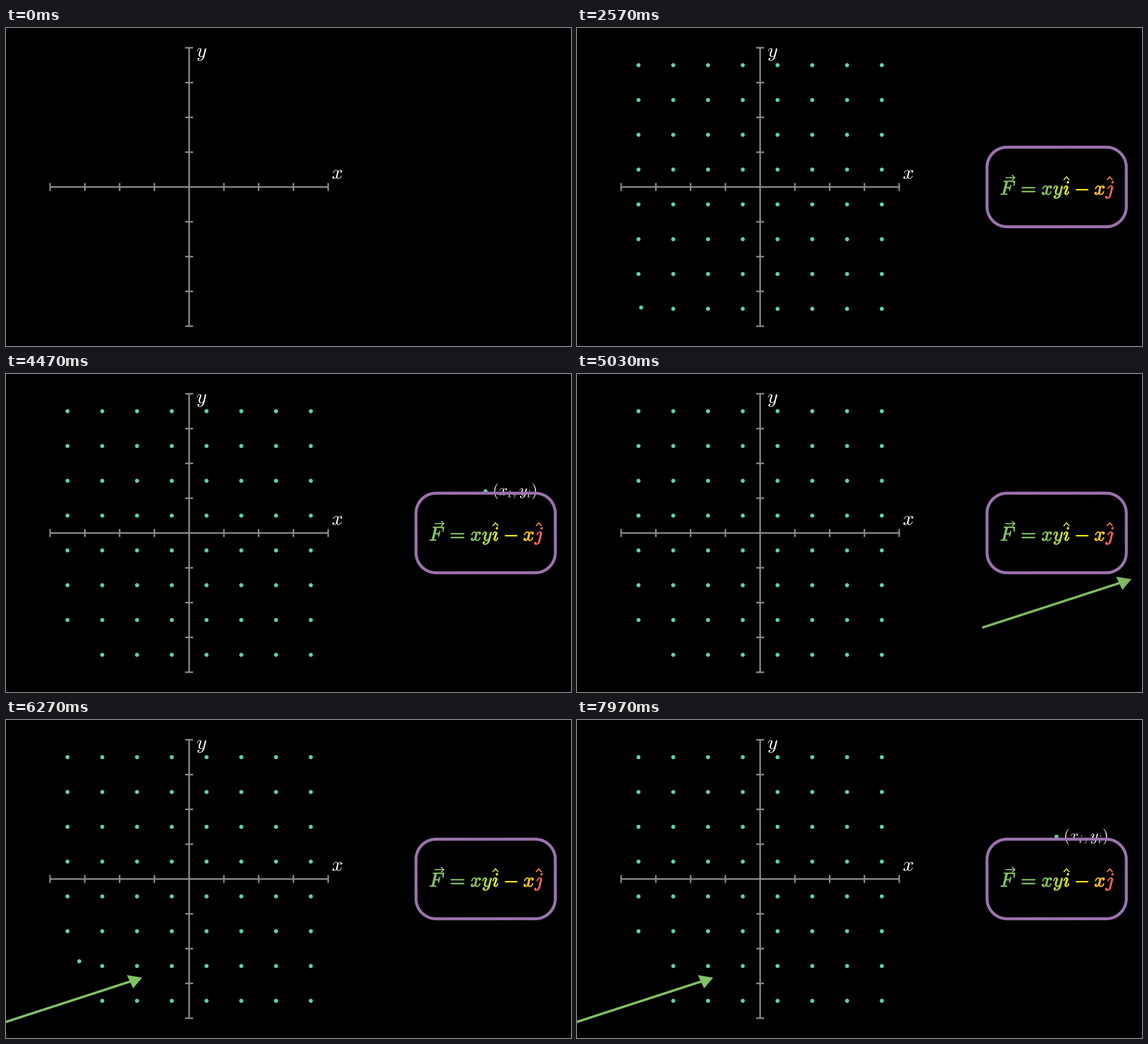
A matplotlib script for the animation above (8000 ms loop, 998 px wide and 561 px high).

```python
import numpy as np
import matplotlib.pyplot as plt
from matplotlib.animation import FuncAnimation
from matplotlib.collections import PatchCollection
from matplotlib.patches import Circle, PathPatch, Polygon
from matplotlib.path import Path
from matplotlib.textpath import TextPath

W, H, DPI = 998, 561, 100
FRAMES, LOOP_MS = 240, 8000
PX = 72 / DPI

GREY, TEAL, PURPLE, GREEN = "#888888", "#5CD0B3", "#9A72AC", "#83C167"
ORIGIN = np.array([323.5, 280.5])
STEP = 61.4
UNIT = H / 8
HOLD = np.array([847.0, 137.0])

# timeline, in frames
RUN = 30
FORMULA_IN, FORMULA_LEN = 30, 15
ARROW_IN, ARROW_GO = 135, 153
PICKS = (75, 183)

plt.rcParams["mathtext.fontset"] = "cm"
fig = plt.figure(figsize=(W / DPI, H / DPI), dpi=DPI, facecolor="black")
ax = fig.add_axes([0, 0, 1, 1])
ax.set_xlim(0, W)
ax.set_ylim(H, 0)
ax.axis("off")


def smooth(t):
    t = np.clip(t, 0, 1)
    edge = 1 / (1 + np.exp(5))
    return np.clip((1 / (1 + np.exp(5 - 10 * t)) - edge) / (1 - 2 * edge), 0, 1)


def stroke(points, color, width, z=2, **kw):
    xs, ys = np.transpose(points)
    return ax.plot(xs, ys, color=color, lw=width * PX, zorder=z, snap=False, **kw)[0]


def tex_path(tex, size, left, base):
    """Math text with its ink starting at `left` on the baseline `base`."""
    path = TextPath((0, 0), f"${tex}$", size=size)
    verts = path.vertices.copy()
    verts[:, 0] += left - path.get_extents().x0
    verts[:, 1] = base - verts[:, 1]
    return Path(verts, path.codes)


def tex(string, size, left, base, color="white", bold=0.0, z=3):
    path = tex_path(string, size, left, base)
    return ax.add_patch(PathPatch(path, fc=color, ec=color if bold else "none",
                                  lw=bold * PX, zorder=z, snap=False))


def draw_axes():
    span, tick = 4 * STEP, 7
    for axis in (np.array([1, 0]), np.array([0, 1])):
        stroke([ORIGIN - span * axis, ORIGIN + span * axis], GREY, 2.8,
               solid_capstyle="butt")
        for k in range(-4, 5):
            mid = ORIGIN + k * STEP * axis
            stroke([mid - tick * axis[::-1], mid + tick * axis[::-1]], GREY, 2.8,
                   solid_capstyle="butt")
    tex("x", 35, 576.5, 266.2)
    tex("y", 35, 337.5, 51.2)


def rounded_box(x0, y0, x1, y1, r):
    """Outline running counter-clockwise from the top right."""
    arcs = [(x0 + r, y0 + r, 270), (x0 + r, y1 - r, 180),
            (x1 - r, y1 - r, 90), (x1 - r, y0 + r, 0)]
    corners = []
    for cx, cy, start in arcs:
        a = np.radians(np.linspace(start, start - 90, 20))
        corners.append(np.column_stack([cx + r * np.cos(a), cy + r * np.sin(a)]))
    pts = np.vstack([[(x1 - r, y0)], *corners])
    dist = np.r_[0, np.cumsum(np.hypot(*np.diff(pts, axis=0).T))]
    s = np.linspace(0, dist[-1], 400)
    return np.column_stack([np.interp(s, dist, pts[:, i]) for i in (0, 1)])


def point_label(left, base, em):
    """The text (x_i, y_i), set with offsets in em."""
    sub = 0.7
    parts = [("(", 0, 1), ("x", 0.317, 1), ("i", 0.88, sub), (",", 1.227, 1),
             ("y", 1.622, 1), ("i", 2.106, sub), (")", 2.43, 1)]
    return Path.make_compound_path(*[
        tex_path(s, em * k, left + dx * em, base + (0.15 * em if k == sub else 0))
        for s, dx, k in parts])


def hat(x, color):
    return stroke([(x - 4.3, 267.5), (x, 262.5), (x + 4.3, 267.5)], color, 1.9, z=6)


def build_formula():
    def sign(string, left, color):
        return [tex(string, 35, left, 294, color, bold=1.1, z=6)]

    vec = [stroke([(758, 264), (773, 264)], GREEN, 1.9, z=6),
           stroke([(769, 260), (773.5, 264), (769, 268)], GREEN, 1.9, z=6)]
    return [vec, sign("F", 748.5, GREEN), sign("=", 785.8, GREEN),
            sign("x", 821.3, "#88C464"), sign("y", 841.6, "#ABD645"),
            [hat(864.6, "#DDEE20")], sign("i", 859.7, "#EAF416"),
            sign("-", 881.5, "#FFF200"), sign("x", 914.5, "#FFC21E"),
            [hat(941, "#FF9035")], sign("j", 933.3, "#FC6255")]


draw_axes()

side = (np.arange(8) - 3.5) * STEP
spots = [(ORIGIN[0] + dx, ORIGIN[1] + dy) for dx in side for dy in side[::-1]]
homes = np.array(spots[:2])
grid = ax.add_collection(PatchCollection([Circle(p, 3.6) for p in spots[2:]],
                                         fc=TEAL, ec="none", zorder=4))
movers = [ax.add_patch(Circle(p, 3.6, fc=TEAL, ec="none", zorder=4)) for p in homes]

label_path = point_label(862.4, 143.9, 27.7)
label = ax.add_patch(PathPatch(label_path, fc="white", ec="none", zorder=4, snap=False))

outline = rounded_box(724.2, 210.2, 970.3, 350.7, 35.5)
box = stroke(outline, PURPLE, 5.2, z=5, solid_capstyle="butt")
glyphs = build_formula()

TAIL, NECK = np.array([-263.5, 85.5]), np.array([-20.0, 6.5])
BARBS = np.array([(0, 0), (-27, -4.5), (-16, 19)])
TIP_A, TIP_B = np.array([979.2, 362.0]), np.array([240.5, 454.5])
shaft = stroke([TAIL, NECK], GREEN, 4.2, z=7, solid_capstyle="butt")
head = ax.add_patch(Polygon(BARBS, closed=True, fc=GREEN, ec="none", zorder=7))


def show_formula(n):
    t = (n - FORMULA_IN) / FORMULA_LEN
    count = int(round(smooth(t) * len(outline)))
    box.set_data(outline[:count, 0], outline[:count, 1])
    for k, parts in enumerate(glyphs):
        alpha = np.clip(t * (len(glyphs) + 3) / 4 - k / 4, 0, 1)
        for part in parts:
            part.set_alpha(alpha)


def show_dots(n):
    fade = smooth(n / RUN)
    grid.set_alpha(fade)
    label.set_alpha(0)
    for dot, home, start in zip(movers, homes, PICKS):
        arrive = start + RUN
        leave = smooth((n - arrive - RUN) / (ARROW_GO - ARROW_IN))
        drop = UNIT * smooth((n - arrive) / RUN)
        spot = home + (HOLD - home) * smooth((n - start) / RUN)
        dot.center = (spot[0], spot[1] + drop)
        dot.set_alpha(fade * (1 - leave))
        if n >= arrive and leave < 1:
            label.set_path(Path(label_path.vertices + [0, drop], label_path.codes))
            label.set_alpha(1 - leave)


def show_arrow(n):
    tip = TIP_A + (TIP_B - TIP_A) * smooth((n - ARROW_GO) / RUN)
    shaft.set_data(*np.transpose([tip + TAIL, tip + NECK]))
    head.set_xy(tip + BARBS)
    alpha = smooth((n - ARROW_IN) / (ARROW_GO - ARROW_IN))
    shaft.set_alpha(alpha)
    head.set_alpha(alpha)


def update(n):
    show_dots(n)
    show_formula(n)
    show_arrow(n)
    return []


anim = FuncAnimation(fig, update, frames=FRAMES, interval=LOOP_MS / FRAMES,
                     init_func=lambda: update(0), repeat=True, repeat_delay=0)
plt.show()
```
